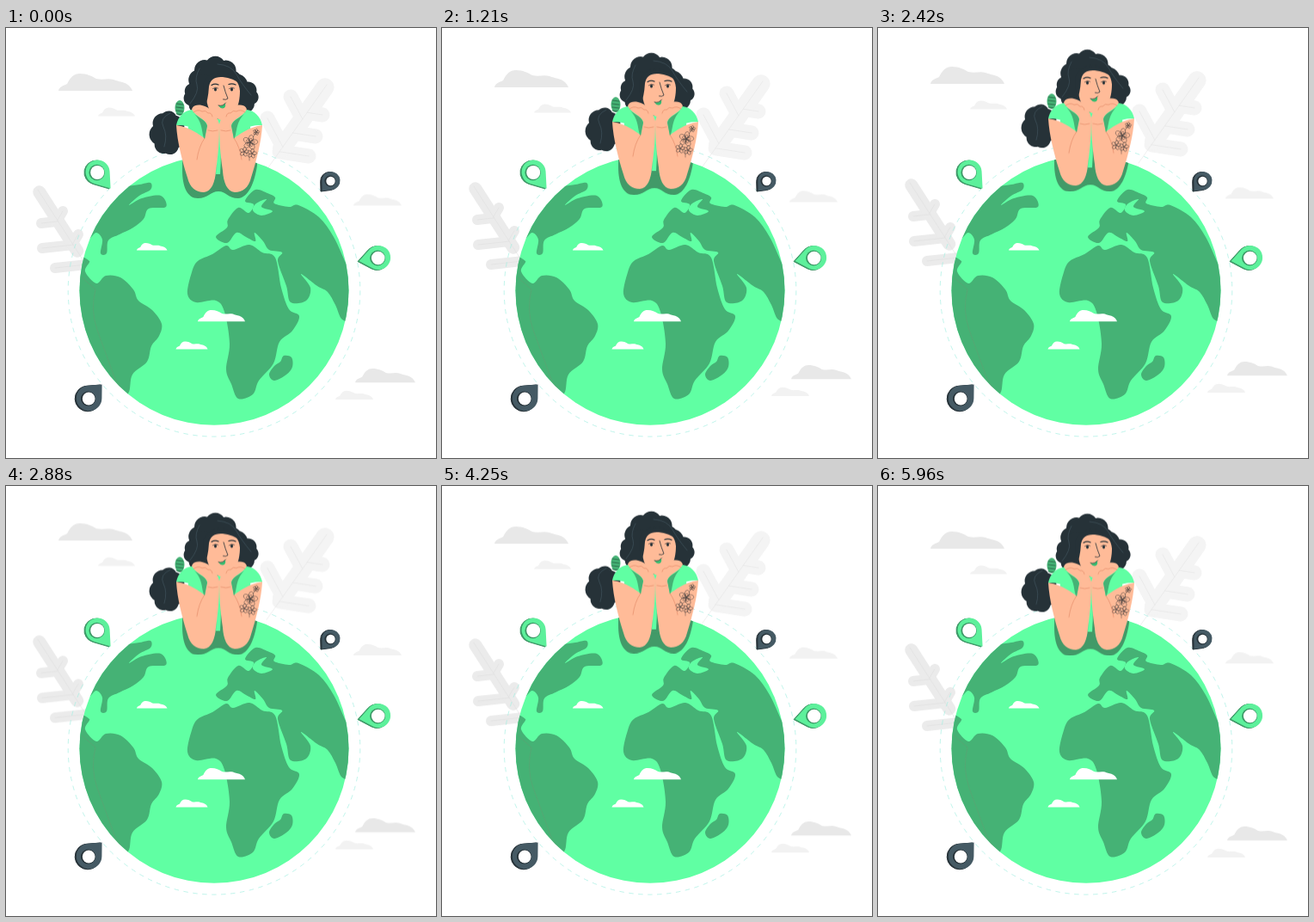
Animation, 500 px wide and 500 px high, one loop 6000 ms. Source, as an HTML page:

```html
<!DOCTYPE html>
<html lang="en">
<head>
<meta charset="utf-8">
<title>Green planet</title>
<style>
  html, body { margin: 0; width: 100%; height: 100%; overflow: hidden; background: #fff; }
  svg { display: block; width: 100vw; height: 100vh; }
  .line { fill: none; stroke-linecap: round; stroke-linejoin: round; }
</style>
</head>
<body>
<svg viewBox="0 0 500 500">
  <defs>
    <clipPath id="disc"><circle cx="242" cy="305.3" r="156.5"/></clipPath>
  </defs>
  <g id="plants" class="drift"></g>
  <g id="clouds" class="drift"></g>
  <circle cx="242" cy="305.3" r="169.8" fill="none" stroke="#a5efe2" stroke-width=".7" stroke-dasharray="5.5 5.5"/>
  <circle cx="242" cy="305.3" r="156.5" fill="#60ffa3"/>
  <g id="land" clip-path="url(#disc)"></g>
  <g id="sky"></g>
  <g id="pins"></g>
  <g clip-path="url(#disc)"><g id="shade" class="bob"></g></g>
  <g class="bob">
    <g id="hair"></g>
    <g id="body"></g>
    <g id="face"></g>
    <g id="arm"></g>
    <use href="#arm" transform="translate(496 0) scale(-1 1)"/>
    <g id="tattoo"></g>
  </g>
</svg>
<script>
const NS = 'http://www.w3.org/2000/svg';
const GREEN = '#60ffa3', LAND = '#45b275', DEEP = '#429a68';
const DARK = '#263238', SLATE = '#455a64', SKIN = '#ffbb98', FOLD = '#e58f6c', INK = '#4c4543';

function add(parent, tag, attrs) {
  const el = document.createElementNS(NS, tag);
  for (const key in attrs) el.setAttribute(key, attrs[key]);
  document.getElementById(parent).append(el);
}
const shape = (parent, fill, d) => add(parent, 'path', { d, fill });
const line = (parent, stroke, width, d) =>
  add(parent, 'path', { d, stroke, 'stroke-width': width, class: 'line' });

// Smooth closed curve through a few "x,y" points.
function blob(parent, fill, text) {
  const p = text.trim().split(/\s+/).map(pair => pair.split(',').map(Number));
  const at = i => p[(i + p.length) % p.length];
  let d = 'M' + p[0];
  p.forEach((a, i) => {
    const o = at(i - 1), b = at(i + 1), c = at(i + 2);
    const c1 = [0, 1].map(k => a[k] + (b[k] - o[k]) / 6);
    const c2 = [0, 1].map(k => b[k] - (c[k] - a[k]) / 6);
    d += `C${c1} ${c2} ${b}`;
  });
  shape(parent, fill, d + 'Z');
}

// Ellipse edged with round waves.
function curls(x, y, rx, ry, count) {
  const at = i => {
    const a = i / count * 2 * Math.PI - 1.9;
    return [x + rx * Math.cos(a), y + ry * Math.sin(a)];
  };
  let d = 'M' + at(0);
  for (let i = 0; i < count; i++) {
    const a = at(i), b = at(i + 1);
    const r = Math.hypot(b[0] - a[0], b[1] - a[1]) * .62;
    d += `A${r} ${r} 0 0 1 ${b}`;
  }
  shape('hair', DARK, d + 'Z');
}

// Midrib with round lobes that leave it at a slant.
function leaf(fill, vein, base, tip, width, lobes) {
  const dx = tip[0] - base[0], dy = tip[1] - base[1], size = Math.hypot(dx, dy);
  const rib = t => [base[0] + dx * t, base[1] + dy * t];
  const veins = [`M${base}L${tip}`];
  for (const [x, y] of lobes) {
    const u = x - base[0], v = y - base[1];
    const along = (u * dx + v * dy) / size, off = Math.abs(u * dy - v * dx) / size;
    veins.push(`M${rib((along - off * .5) / size)}L${x} ${y}`);
  }
  line('plants', fill, width, veins.slice(1).join(''));
  line('plants', fill, width * 1.25, `M${rib(.25)}L${rib(.97)}`);
  line('plants', vein, .6, veins.join(''));
}

// Flat-based cloud fitted to a box.
function cloud(parent, fill, x, y, w, h) {
  add(parent, 'path', {
    fill,
    d: 'M0 20C1 15 6 14 10 12C14 4 18 0 25 0C33 0 39 3 44 6C52 8 57 5 64 7C70 10 82 9 86 20Z',
    transform: `translate(${x} ${y}) scale(${w / 86} ${h / 20})`
  });
}

// Map pin: ring with tangents running to its tip.
function pin(x, y, r, hole, tipX, tipY, front, back) {
  const turn = Math.atan2(tipY - y, tipX - x);
  const half = Math.acos(r / Math.hypot(tipX - x, tipY - y));
  const on = a => [x + r * Math.cos(a), y + r * Math.sin(a)];
  const d = `M${tipX} ${tipY}L${on(turn + half)}A${r} ${r} 0 1 1 ${on(turn - half)}Z`;
  const look = { d, 'stroke-width': 1, 'stroke-linejoin': 'round' };
  add('pins', 'path', { ...look, fill: back, stroke: back });
  add('pins', 'path', { ...look, fill: front, transform: 'translate(1.6 -.5)' });
  add('pins', 'circle', { cx: x + .6, cy: y, r: hole + 1.2, fill: back });
  add('pins', 'circle', { cx: x + 1.2, cy: y, r: hole, fill: '#fff' });
}

leaf('#f4f4f4', '#e4e4e4', [303, 165], [373, 66], 17,
  [[304, 105], [331, 80], [368, 101], [360, 126], [352, 149]]);
leaf('#ebebeb', '#e0e0e0', [98, 283], [37, 188], 12,
  [[41, 227], [42, 256], [57, 279], [66, 213], [84, 240]]);

for (const [x, y, size, fill] of [
  [61, 53, 86, '#e8e8e8'], [107, 92.5, 43, '#f2f2f2'], [404, 193.5, 56, '#f2f2f2'],
  [406, 396, 70, '#e8e8e8'], [383, 421.7, 44, '#f2f2f2']
]) cloud('clouds', fill, x, y, size, size * .233);
for (const [x, y, size] of [[152, 250, 35.5], [223, 328, 55], [197.5, 364.5, 37]])
  cloud('sky', '#fff', x, y, size, size * .24);

// Americas
blob('land', LAND, `122,190 155,182 168,180 168,188 155,195 143,206 158,198 180,195 186,208 166,210
  160,222 148,232 132,240 119,247 117,262 110,262 112,246 105,238 97,245 86,250 90,220`);
blob('land', LAND, `80,275 97,271 92,283 105,297 116,288 133,290 148,304 154,317 170,328 181,344
  178,358 169,370 164,388 147,403 142,425 125,432 75,370`);
line('land', '#5f9f72', .6, 'M88 290L104 304Q98 328 106 351L128 411L142 428');
// Africa
blob('land', LAND, `256,253 264,258 283,252 298,261 313,267 320,302 329,327 341,335 333,352 318,365
  311,390 294,410 287,426 270,431 262,414 256,397 260,367 254,330 244,317 221,319 211,309 216,284
  223,271 240,263`);
blob('land', LAND, '306,403 312,393 319,388 323,381 332,383 333,394 326,403 312,410');
// Europe and Asia
blob('land', LAND, `244,243 257,232 258,223 270,209 282,215 288,205 278,201 290,188 304,192 313,197
  312,204 329,208 340,206 364,220 381,243 395,273 405,292 405,338 391,339 383,322 374,307 362,300
  343,286 354,302 349,317 331,319 326,300 316,271 321,261 306,258 299,248 289,238 290,248 279,243
  268,238 257,250`);
blob('land', GREEN, '291,204 303,199 297,208 310,213 297,218 287,212');

pin(105, 168, 14, 8, 120, 187, '#5df09b', '#3c9866');
pin(431.5, 267.5, 14, 7.8, 409, 271.5, '#5df09b', '#3c9866');
pin(95, 431, 14.8, 7.4, 110, 415, SLATE, DARK);
pin(376.3, 178, 10.6, 5.2, 366, 190, SLATE, DARK);

shape('shade', DEEP, 'M205 130V165C205 185 211 198 223 198C235 198 238 190 247 190C256 190 258 198 270 198C282 197 289 180 292 160V130Z');

curls(188, 122, 18, 24, 7);
curls(243, 64, 28, 28, 9);
curls(250, 79, 42, 24, 11);
line('hair', SLATE, .6, 'M225 47Q219 58 222 66T214 88M246 42Q262 43 268 54T285 78M191 99Q178 105 183 115T184 138');
add('hair', 'ellipse', { cx: 202, cy: 93, rx: 5.5, ry: 9, fill: LAND });
for (let y = 88; y < 101; y += 4) line('hair', '#245f41', .8, `M198 ${y}L206 ${y + 1}`);

shape('body', GREEN, 'M216 96L248 106L280 96L285 120L272 175H224L211 120Z');
shape('body', DEEP, 'M243 175L247 115H251L253 175Z');
shape('body', GREEN, 'M244 170L246 115H248.5Q251 145 249 170Z');

shape('face', SKIN, 'M233 61C238 55 246 53 256 55C266 57 271 63 272 73C272 91 266 104 250 107C238 104 230 90 233 61Z');
shape('face', DARK, 'M229 66Q233 52 250 52Q262 51 274 66Q264 58 252 57Q238 56 236 68Q235 84 231 93Z');
line('face', DARK, 1.3, 'M239 66.5Q243 64 247 66M259 65.5Q263 64 267 66');
for (const x of [243.5, 262.5]) {
  add('face', 'ellipse', { cx: x, cy: 71.5, rx: 1.5, ry: 1.9, fill: DARK });
  line('face', DARK, .7, `M${x - 3} 70.5q3 -2.5 6 -.5`);
}
line('face', DARK, .8, 'M253 67Q255 75 258 82Q256 84 252.5 83');
shape('face', '#36bd70', 'M247 90Q252 91.5 255 87.5Q256 93 252 93.5Q249 93.5 247 90Z');
line('face', DARK, .7, 'M247 90Q252 91.5 255.5 87');

// One arm; the other is its mirror image.
shape('arm', SKIN, 'M198 113C199 132 205 155 211 174C214 186 221 191 230 191C239 190 243 180 244 166C247 145 248 130 248 112C245 100 237 92 228 90C219 88 214 93 217 98C222 104 231 106 233 112L231 128C224 124 216 116 198 113Z');
shape('arm', GREEN, 'M198 113C200 103 207 96 216 95C222 104 232 106 234 113L231 129C224 120 214 112 198 113Z');
shape('arm', LAND, 'M219 100C227 106 233 108 234 114L231 129C227 124 230 111 219 100Z');
line('arm', FOLD, .7, 'M231 128Q224 138 222 153M235 119Q240 121 246 119M218 98Q223 94 228 97Q232 95 235 99Q239 98 240 103');

for (const [x, y, r] of [[284, 133, 7], [284, 133, 4], [277, 144, 4.5], [286, 146, 4.5], [291, 121, 3]])
  for (let turn = 12; turn < 360; turn += 72)
    add('tattoo', 'ellipse', {
      cx: x, cy: y - r * .65, rx: r * .4, ry: r * .6, class: 'line', stroke: INK,
      'stroke-width': .5, transform: `rotate(${turn} ${x} ${y})`
    });
line('tattoo', INK, .5, 'M287 127L291 121M283 148V154');

const begin = document.timeline.currentTime || 0;
function float(selector, duration) {
  const steps = [0, -10, 0].map(y => ({ transform: `translateY(${y}px)` }));
  for (const el of document.querySelectorAll(selector))
    el.animate(steps, { duration, iterations: Infinity }).startTime = begin;
}
float('.bob', 1500);
float('.drift', 6000);
</script>
</body>
</html>
```
